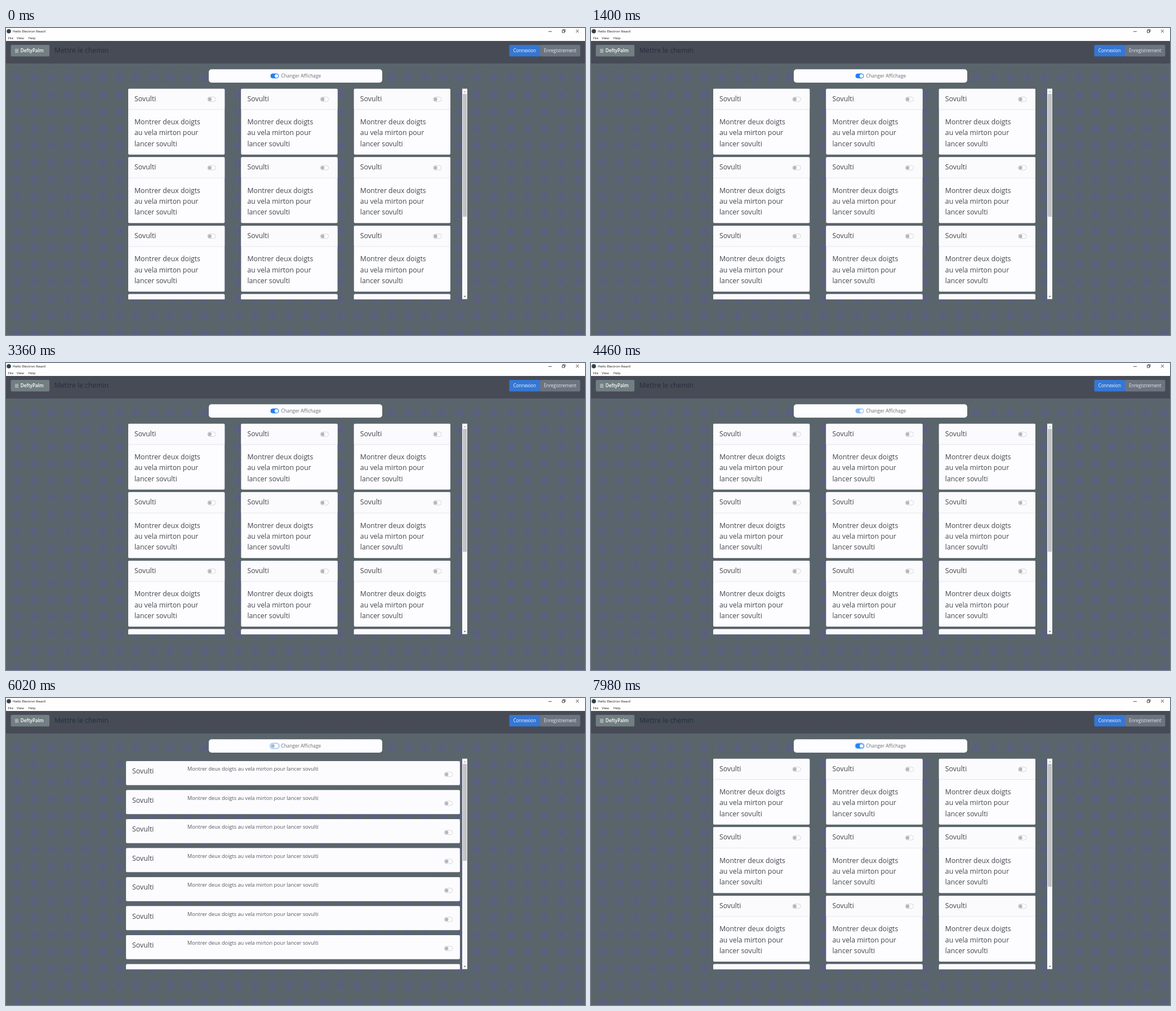
Animation of 1028 by 545 pixels, one loop 8 s. Source, as an HTML page:

```html
<!DOCTYPE html>
<html lang="fr">
<head>
<meta charset="utf-8">
<title>Hello Electron React!</title>
<style>
html, body { margin: 0; width: 100%; height: 100%; overflow: hidden; background: #5a656b; }
svg { display: block; width: 1028px; height: 545px; font-family: "Open Sans", "Noto Sans", sans-serif; }
</style>
</head>
<body>
<svg id="stage" viewBox="0 0 1028 545">
  <defs>
    <radialGradient id="glow">
      <stop offset="0.2" stop-color="#5a5d88" stop-opacity=".75"/>
      <stop offset="1" stop-color="#5a5d88" stop-opacity="0"/>
    </radialGradient>
    <pattern id="dots" x="4.9" y="72.9" width="30.2" height="30.2" patternUnits="userSpaceOnUse">
      <circle cx="15.1" cy="15.1" r="11" fill="url(#glow)"/>
    </pattern>
    <clipPath id="view"><rect x="200" y="107.5" width="620" height="374"/></clipPath>
  </defs>
</svg>
<script>
const stage = document.getElementById('stage');
const LOOP = 8000, FADE = 150;
const PRESS_OFF = 4400, SET_OFF = 4540, PRESS_ON = 6800, SET_ON = 6940;
const APP = 'Sovulti';
const LINES = ['Montrer deux doigts', 'au vela mirton pour', 'lancer sovulti'];

function add(parent, tag, attrs) {
  const el = document.createElementNS('http://www.w3.org/2000/svg', tag);
  for (const k in attrs) el.setAttribute(k, attrs[k]);
  return parent.appendChild(el);
}
const rect = (p, x, y, width, height, fill, rx = 0) => add(p, 'rect', { x, y, width, height, fill, rx });
const line = (p, d, stroke, w = 0.8) => add(p, 'path', { d, stroke, 'stroke-width': w, fill: 'none' });
function text(p, x, y, size, fill, str, weight = 400) {
  add(p, 'text', { x, y, fill, 'font-size': size, 'font-weight': weight }).textContent = str;
}
function toggle(p, x, cy) {
  const track = add(p, 'rect', { x: x + .3, y: cy - 4, width: 14.4, height: 8, rx: 4,
    fill: '#fff', stroke: '#b4b8bc', 'stroke-width': .6 });
  const knob = add(p, 'circle', { cx: x + 4.3, cy, r: 3.2, fill: '#b4b8bc' });
  return { track, knob };
}

// Window frame
rect(stage, 0, 0, 1028, 545, '#5a656b');
rect(stage, 0, 0, 1028, 545, 'url(#dots)');
rect(stage, 0, 0, 1028, 23, '#fefefe');
add(stage, 'circle', { cx: 5, cy: 5.7, r: 3.8, fill: '#354047' });
text(stage, 12, 8.2, 6.15, '#111', 'Hello Electron React!');
[['File', 3.5], ['View', 19], ['Help', 39.5]].forEach(([s, x]) => text(stage, x, 19.6, 6, '#222', s));
line(stage, 'M963 6.2h6M987.5 4.2h4v4h-4zM988.8 4v-1.3h4v4h-1.2M1012 3l5 5m0-5l-5 5', '#222');

// Navigation bar
rect(stage, 0, 23, 1028, 40, '#474b56');
rect(stage, 8.5, 30, 68.7, 20.5, '#717e82', 2);
line(stage, 'M16 38h6.2M16 40.5h6.2M16 43h6.2', '#fff');
text(stage, 25.7, 43.3, 8.2, '#fff', 'DeftyPalm', 600);
text(stage, 86, 44.3, 12.2, '#252d3c', 'Mettre le chemin');
rect(stage, 893.5, 30, 55, 20.5, '#3577d3', 2);
rect(stage, 948, 30, 71.5, 20.5, '#6c7480', 2);
text(stage, 900.7, 43.3, 8.05, '#f4f8ff', 'Connexion');
text(stage, 955, 43.3, 8.05, '#e8eaee', 'Enregistrement');

// Layout switch
rect(stage, 360, 73.3, 308, 23.7, '#fdfdff', 5);
const ring = add(stage, 'rect', { x: 468.7, y: 80.2, width: 16.6, height: 9.8, rx: 4.9,
  fill: 'none', stroke: '#007bff', 'stroke-opacity': .3, 'stroke-width': 1.7 });
const main = toggle(stage, 469.5, 85.1);
text(stage, 488.5, 88.2, 8.3, '#686b6f', 'Changer Affichage');

const content = add(stage, 'g', { 'clip-path': 'url(#view)' });

const grid = add(content, 'g');
for (let i = 0; i < 12; i++) {
  const x = 217 + i % 3 * 200.4, y = 107.7 + Math.floor(i / 3) * 121.6;
  rect(grid, x, y, 171.2, 117, '#fdfdff', 2);
  rect(grid, x, y, 171.2, 37, '#fbfbfd', 2);
  line(grid, `M${x} ${y + 37}h171.2`, '#dedee2', .7);
  text(grid, x + 11, y + 22, 12.4, '#42464a', APP);
  toggle(grid, x + 140.5, y + 18.8);
  LINES.forEach((s, n) => text(grid, x + 11, y + 63.3 + n * 19.3, 12.3, '#42464a', s));
}

const list = add(content, 'g');
for (let i = 0; i < 8; i++) {
  const y = 112 + i * 51.5;
  rect(list, 213, y, 593, 42.8, '#d5d7da', 2);
  rect(list, 213.3, y, 592.4, 42.2, '#fcfcfe', 2);
  text(list, 224, y + 22, 12.4, '#42464a', APP);
  text(list, 322, y + 17.4, 9.17, '#55595d', LINES.join(' '));
  toggle(list, 778, y + 23.6);
}

// Scrollbar
rect(stage, 810, 107.7, 9, 373.6, '#f8f8fa');
const thumb = rect(stage, 811, 117, 7.2, 218, '#c3c3c5');
add(stage, 'path', { d: 'M812.7 114l1.9-2 1.9 2z', fill: '#a4a4a6' });
add(stage, 'path', { d: 'M812.7 475.7l1.9 2 1.9-2z', fill: '#505052' });

const WHITE = [255, 255, 255], GREY = [180, 184, 188], BLUE = [35, 129, 246],
      PALE = [179, 215, 255], FOCUS = [128, 189, 255];
// Each row: start time, track, border, knob colour, knob shift, ring
const steps = [
  [0, BLUE, BLUE, WHITE, 6.4, 0],
  [PRESS_OFF, PALE, PALE, WHITE, 6.4, 0],
  [SET_OFF, WHITE, FOCUS, GREY, 0, 1],
  [PRESS_ON, PALE, PALE, GREY, 0, 0],
  [SET_ON, BLUE, BLUE, WHITE, 6.4, 1]
];
const mix = (a, b, k) => a + (b - a) * k;
const tint = (a, b, k) => `rgb(${a.map((v, i) => Math.round(mix(v, b[i], k)))})`;

function draw(now) {
  const t = now % LOOP;
  const i = steps.findLastIndex(s => t >= s[0]);
  const to = steps[i], from = steps[Math.max(0, i - 1)];
  const p = Math.min(1, (t - to[0]) / FADE), k = 1 - (1 - p) ** 2;
  main.track.setAttribute('fill', tint(from[1], to[1], k));
  main.track.setAttribute('stroke', tint(from[2], to[2], k));
  main.knob.setAttribute('fill', tint(from[3], to[3], k));
  main.knob.setAttribute('cx', 473.8 + mix(from[4], to[4], k));
  ring.setAttribute('opacity', to[5] * k);

  const isList = t >= SET_OFF && t < SET_ON;
  grid.setAttribute('display', isList ? 'none' : 'inline');
  list.setAttribute('display', isList ? 'inline' : 'none');
  thumb.setAttribute('height', isList ? 172 : 218);
}

const start = performance.now();
function tick() {
  draw(performance.now() - start);
  requestAnimationFrame(tick);
}
tick();
</script>
</body>
</html>
```
